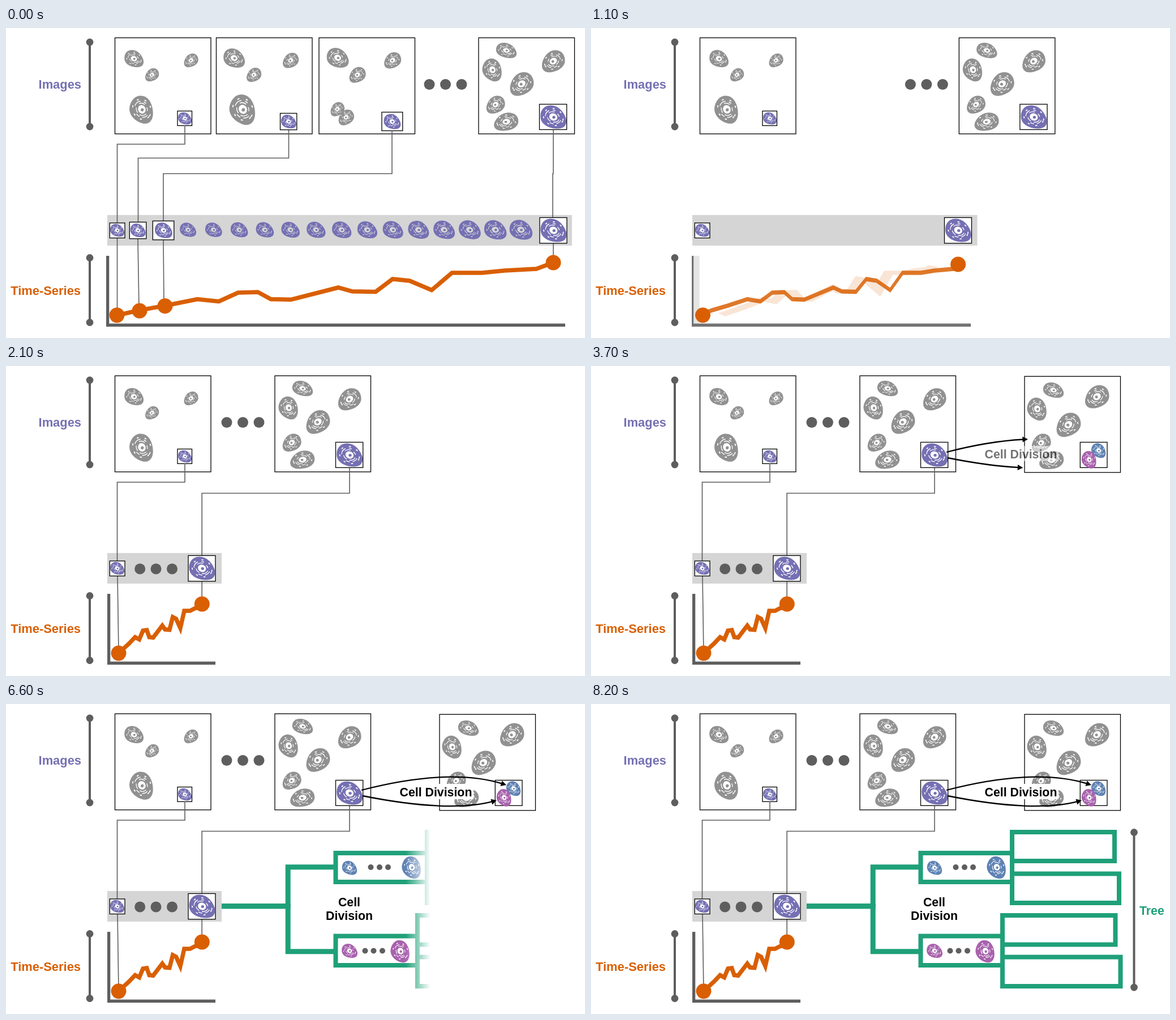
Write an HTML page that moves like this. It is 1023x547 px and loops after 8.55 s.

```html
<!DOCTYPE html>
<html lang="en">
<head>
<meta charset="utf-8">
<title>Cell lineage</title>
<style>
html, body { margin: 0; width: 100%; height: 100%; overflow: hidden; background: #fff; }
svg { display: block; width: 100vw; height: 100vh; }
text { font: bold 21.3px "Liberation Sans", Arial, sans-serif; }
.label { font-size: 21.9px; }
.wire { fill: none; stroke: #5e5e5e; stroke-width: 1.6; }
.frame { fill: #fff; stroke: #000; stroke-width: 1.3; }
.series { fill: none; stroke: #d95f02; stroke-width: 7.5; }
.green { fill: none; stroke: #1fa079; stroke-width: 8; }
.arrow { fill: none; stroke: #000; stroke-width: 2.3; }
</style>
</head>
<body>
<svg id="stage" viewBox="0 0 1023 547" xmlns="http://www.w3.org/2000/svg"></svg>
<script>
const LOOP = 8550, STEP = 100;
const GREY = '#919191', DARK = '#5e5e5e', PURPLE = '#7570b3',
      ORANGE = '#d95f02', GREEN = '#1fa079', BLUE = '#5e82b3', PINK = '#a862ad';

// ---- markup helpers ----
const group = (id, body) => `<g id="${id}">${body}</g>`;
const dot = (x, y, r, fill = DARK) => `<circle cx="${x}" cy="${y}" r="${r}" fill="${fill}"/>`;
const dots = (xs, y, r) => xs.map(x => dot(x, y, r)).join('');
const wire = d => `<path class="wire" d="${d}"/>`;
const box = (x1, y1, x2, y2, cls = 'frame') =>
  `<rect class="${cls}" x="${x1}" y="${y1}" width="${x2 - x1}" height="${y2 - y1}"/>`;
const label = (x, y, s, fill, anchor = 'start', cls = '') =>
  `<text x="${x}" y="${y}" fill="${fill}" text-anchor="${anchor}" class="${cls}">${s}</text>`;
const span = (x, y1, y2) =>
  `<path d="M${x} ${y1}V${y2}" stroke="${DARK}" stroke-width="4"/>` + dot(x, y1, 6.4) + dot(x, y2, 6.4);

// flip = -1 mirrors the cell; squash changes its height
function cell(x, y, w, rot = 0, color = GREY, flip = 1, squash = 1, hole = '#fff') {
  const s = w / 46;
  return `<use href="#cell" style="color:${color};--hole:${hole}" ` +
    `transform="translate(${x} ${y}) rotate(${rot}) scale(${s * flip} ${s * squash})"/>`;
}
const tall = (x, y, w, color = GREY) => cell(x, y, w, 20, color, 1, 1.14);
const wide = (x, y, w) => cell(x, y, w, 4, GREY, 1, .8);
const mirrored = (x, y, w, rot = -8, squash = 1) => cell(x, y, w, rot, GREY, -1, squash);
const panel = (x, y, ...cells) => box(x, y, x + 169.5, y + 169.5) + cells.join('');

// ---- scene data ----
const panel1 = panel(192.5, 17.3,
  cell(226, 54, 34), mirrored(327, 57, 26), mirrored(258, 82.5, 25), tall(240, 143.5, 45)
) + box(303, 146.5, 328.5, 172.3) + cell(316, 159.5, 24, 0, PURPLE);

const panel2 = panel(371.5, 17.3,
  cell(403, 53, 38), mirrored(438, 82.5, 27), mirrored(503, 57, 29), tall(418.5, 143.5, 49)
) + box(484.5, 150.5, 513.8, 179.6) + cell(499.3, 165, 27, 0, PURPLE);

const panel3 = panel(553, 17.3,
  cell(586, 52.5, 39), mirrored(621, 82.5, 30), mirrored(683, 57, 31),
  mirrored(585.5, 143, 26, -14), mirrored(601, 157.5, 29, -14)
) + box(664, 148.5, 700.8, 181.3) + cell(682.3, 165, 30, 0, PURPLE);

const lastPanel = panel(835, 17.3,
  wide(884, 39.5, 37), tall(859.5, 73.5, 37), mirrored(967, 58.5, 42), mirrored(911, 98.5, 44, -12),
  mirrored(865, 135, 34), mirrored(884, 165.3, 43, 2, .85)
) + box(942.5, 134.5, 990.7, 179.3) + cell(967, 157, 46, 0, PURPLE);

const nextPanel = panel(766, 18.3,
  wide(817, 42.5, 37), tall(788.5, 75.5, 37), mirrored(894, 54, 44), mirrored(843.5, 103.5, 45, -12),
  mirrored(795.5, 135.5, 35), mirrored(814, 166, 43, 2, .85)
) + box(864.3, 134.5, 912, 179.3);

const strip = Array.from({ length: 14 }, (_, i) =>
  cell(321.5 + 45.25 * i, 356, 29 + .9 * i, 0, PURPLE, 1, .96, '#d5d5d5')).join('');

const line = [[196, 507], [236, 498], [281, 490], [338, 478.5], [376, 482.5], [410, 467], [445, 466],
  [468, 478.5], [503, 479.3], [587, 458], [612, 464.8], [653, 465.5], [683, 443], [713, 446],
  [752, 462.5], [788, 432], [841, 432], [881, 428], [937, 425], [967, 414]];
const path = pts => 'M' + pts.map(p => p.join(' ')).join('L');
const squeezed = line.map(([x, y]) => [242 + (x - 410) * .193, y]);
squeezed[0] = [199, 506];
squeezed[squeezed.length - 1] = [346, 420];

// L-shaped axes drawn from x = 0
const axes = w => `<path d="M0 402H5.3V521.5H${w}V527H0Z" fill="${DARK}"/>`;

const tree =
  box(582.5, 263, 744, 314, 'green') + box(744, 226, 925, 277, 'green') + box(744, 299.5, 933, 351, 'green') +
  box(582.5, 409.5, 727, 461, 'green') + box(727, 373, 926.5, 424.5, 'green') + box(727, 446.5, 935.5, 498, 'green') +
  cell(607, 289, 27, 5, BLUE) + dots([644.5, 660, 675], 288, 5) + tall(717, 288, 36, BLUE) +
  cell(607, 435.5, 28, 0, PINK) + dots([634.5, 649.5, 665], 435.5, 5) + tall(697, 436, 36, PINK);

const arrow = (id, d) => `<path id="${id}" class="arrow" d="${d}"/><path id="${id}Tip" d="M0 0L-9.5 -5V5Z"/>`;

const stage = document.getElementById('stage');
stage.innerHTML = `
<defs>
  <g id="cell">
    <path fill="currentColor" d="M-22.5 2C-24-10-18-20-5-20.5C8-21 19-9 22.5 3C25 13 20 20 9 20.5C-5 21-20.5 15-22.5 2Z"/>
    <g transform="rotate(24)" fill="none" stroke-width="1.3" style="stroke:var(--hole)">
      <ellipse rx="11" ry="8.8" stroke-dasharray="12 5 9 8 11 6 6 6"/>
      <ellipse rx="14.4" ry="11.6" stroke-dasharray="10 5 7 14 13 6 5 22"/>
      <ellipse rx="18" ry="14.6" stroke-width="1.8" stroke-linecap="round" stroke-dasharray="2 12"/>
    </g>
    <ellipse rx="7.4" ry="6.2" transform="rotate(24)" style="fill:var(--hole)"/>
    <ellipse cx="1" cy=".5" rx="2.7" ry="2.5" fill="currentColor"/>
  </g>
  <linearGradient id="edge" gradientUnits="userSpaceOnUse" y1="0" y2="0">
    <stop offset="0" stop-color="#fff"/><stop offset="1" stop-color="#000"/>
  </linearGradient>
  <mask id="wipe" maskUnits="userSpaceOnUse" x="0" y="0" width="1023" height="547">
    <rect width="1023" height="547" fill="url(#edge)"/>
  </mask>
</defs>
${label(133, 107, 'Images', PURPLE, 'end', 'label')}
${label(132, 471, 'Time-Series', ORANGE, 'end', 'label')}
${span(148, 25, 174)}${span(148, 405.5, 519.5)}
${panel1}
${group('oldPanels', panel2 + panel3)}
${group('ellipsis', dots([748, 776.5, 805], 99.5, 9.5))}
${group('lastPanel', lastPanel)}
<rect id="band" x="179" y="330" height="54" fill="#d5d5d5"/>
${group('axesA', axes(811))}${group('axesB', axes(191))}
${group('lineA', `<path class="series" d="${path(line)}"/>`)}
${group('lineB', `<path class="series" d="${path(squeezed)}"/>`)}
${group('oldParts', strip +
  wire('M316 172V205H196.5V344M196.5 370V507') +
  wire('M499.5 180V229.5H233.5V342M233 372L235 498') +
  wire('M682 181V257H278V340M278 374L279 490') +
  wire('M967 180V257H966V334M967 380V414') +
  box(218.3, 342.5, 247.8, 371.8) + cell(233, 357, 27, 0, PURPLE) +
  box(259.3, 340.5, 296.8, 373.8) + cell(278.3, 357, 31, 0, PURPLE) +
  dot(236, 499, 13.5, ORANGE) + dot(281, 490.5, 13.5, ORANGE))}
${group('newParts',
  wire('M316 172V205H196.5V344M197 370L199 506') +
  wire('M607 180V224.5H346.2V334M346.2 380V420') + dots([236.7, 265, 293.5], 358, 9.5))}
${box(183.3, 344, 210, 370.5)}${cell(196.5, 357, 25, 0, PURPLE)}
${group('lastCell', box(943, 334.5, 991, 379.8) + cell(967.3, 357, 46, 0, PURPLE))}
<circle id="first" cy="506.7" r="13.5" fill="${ORANGE}"/>
<circle id="last" r="13.5" fill="${ORANGE}"/>
${group('nextPanel', nextPanel)}
${group('twins', cell(897, 149, 27, 15, BLUE) + tall(880.3, 165, 28, PINK))}
${group('caption', '<rect x="691" y="141" width="135" height="27" fill="#fff"/>' + label(759.5, 163, 'Cell Division', '#000', 'middle'))}
${group('arrows', arrow('up', 'M628 152C690 136 800 114 884 143') + arrow('down', 'M630 162C700 176 800 190 867 170'))}
<g fill="none" stroke="${GREEN}" stroke-width="9">
  <path id="forkUp" d="M381 356.8H498.2V287.7H581"/>
  <path id="forkDown" d="M381 356.8H498.2V436.7H581"/>
</g>
${group('split', label(606.5, 357, 'Cell', '#000', 'middle') + label(606.5, 381, 'Division', '#000', 'middle'))}
<g id="tree" mask="url(#wipe)">${tree}</g>
${group('treeLabel', span(959.5, 226.5, 500) + label(969, 372, 'Tree', GREEN))}`;

// ---- motion ----
const $ = id => document.getElementById(id);
const set = (id, attrs) => { for (const k in attrs) $(id).setAttribute(k, attrs[k]); };
const clamp = v => Math.min(1, Math.max(0, v));
const part = (t, a, b) => clamp((t - a) / (b - a));
const ease = p => .5 - .5 * Math.cos(Math.PI * p);
const mix = (a, b, p) => a + (b - a) * p;
const fade = (id, v) => set(id, { opacity: clamp(v), visibility: v > 0 ? 'visible' : 'hidden' });
const slide = (id, dx) => set(id, { transform: `translate(${dx} 0)` });

const lengths = {};
for (const id of ['up', 'down', 'forkUp', 'forkDown']) lengths[id] = $(id).getTotalLength();

function trace(id, p, trim = 0) {
  const n = lengths[id], shown = Math.max(0, n * p - trim);
  set(id, { 'stroke-dasharray': `${shown} ${n + 20}`, visibility: p > 0 ? 'visible' : 'hidden' });
}

function drawArrow(id, p) {
  trace(id, p, 6);
  const d = lengths[id] * p;
  const a = $(id).getPointAtLength(Math.max(0, d - 6)), b = $(id).getPointAtLength(Math.max(6, d));
  const turn = Math.atan2(b.y - a.y, b.x - a.x) * 180 / Math.PI;
  set(id + 'Tip', { transform: `translate(${b.x} ${b.y}) rotate(${turn})` });
}

function render(t) {
  // squeeze the wide layout into the compact one
  const p = part(t, 82, 2085), e = ease(p), blend = p ** 2.7, r = 1 - e;
  fade('oldPanels', 1 - 2.04 * p);
  fade('oldParts', 1 - 2.04 * p);
  fade('newParts', 2.04 * p - 1.04);
  slide('ellipsis', -358 * e);
  slide('lastPanel', -360 * e);
  slide('lastCell', -621 * e);
  set('band', { width: mix(821, 202, e) });
  set('first', { cx: mix(196, 199, e) });
  set('last', { cx: mix(967, 346.3, e), cy: mix(414, 420, e) });

  const left = mix(177, 179, e), w = mix(811, 191, e);
  set('axesA', { transform: `translate(${left} 0) scale(${w / 811} 1)` });
  set('axesB', { transform: `translate(${left} 0) scale(${w / 191} 1)` });
  set('lineA', { transform: `translate(${338 - 120.6 * e} 0) scale(${1 - .761 * e} 1) translate(-338 0)` });
  set('lineB', { transform: `translate(${235 + 179 * r} 0) scale(${1 + 3.169 * r} 1) translate(-235 0)` });
  for (const id of ['axes', 'line']) {
    fade(id + 'A', 1 - blend);
    fade(id + 'B', blend);
  }

  // division
  fade('nextPanel', part(t, 2100, 2700));
  fade('twins', part(t, 2600, 3050));
  const q = part(t, 3160, 4160);
  fade('caption', q);
  fade('arrows', q > 0 ? 1 : 0);
  drawArrow('up', ease(q));
  drawArrow('down', ease(q));

  // lineage tree
  const f = ease(part(t, 4160, 5160));
  trace('forkUp', f);
  trace('forkDown', f);
  fade('split', part(t, 5350, 6150));
  const lead = 578 + 408 * ease(part(t, 6150, 7150));
  set('edge', { x1: lead - 44, x2: lead });
  fade('tree', t > 6150 ? 1 : 0);
  fade('treeLabel', part(t, 7150, 8150));
}

const start = performance.now();
function tick(now) {
  const t = Math.max(0, now - start) % LOOP;
  render(Math.floor(t / STEP) * STEP);
  requestAnimationFrame(tick);
}
render(0);
requestAnimationFrame(tick);
</script>
</body>
</html>
```
